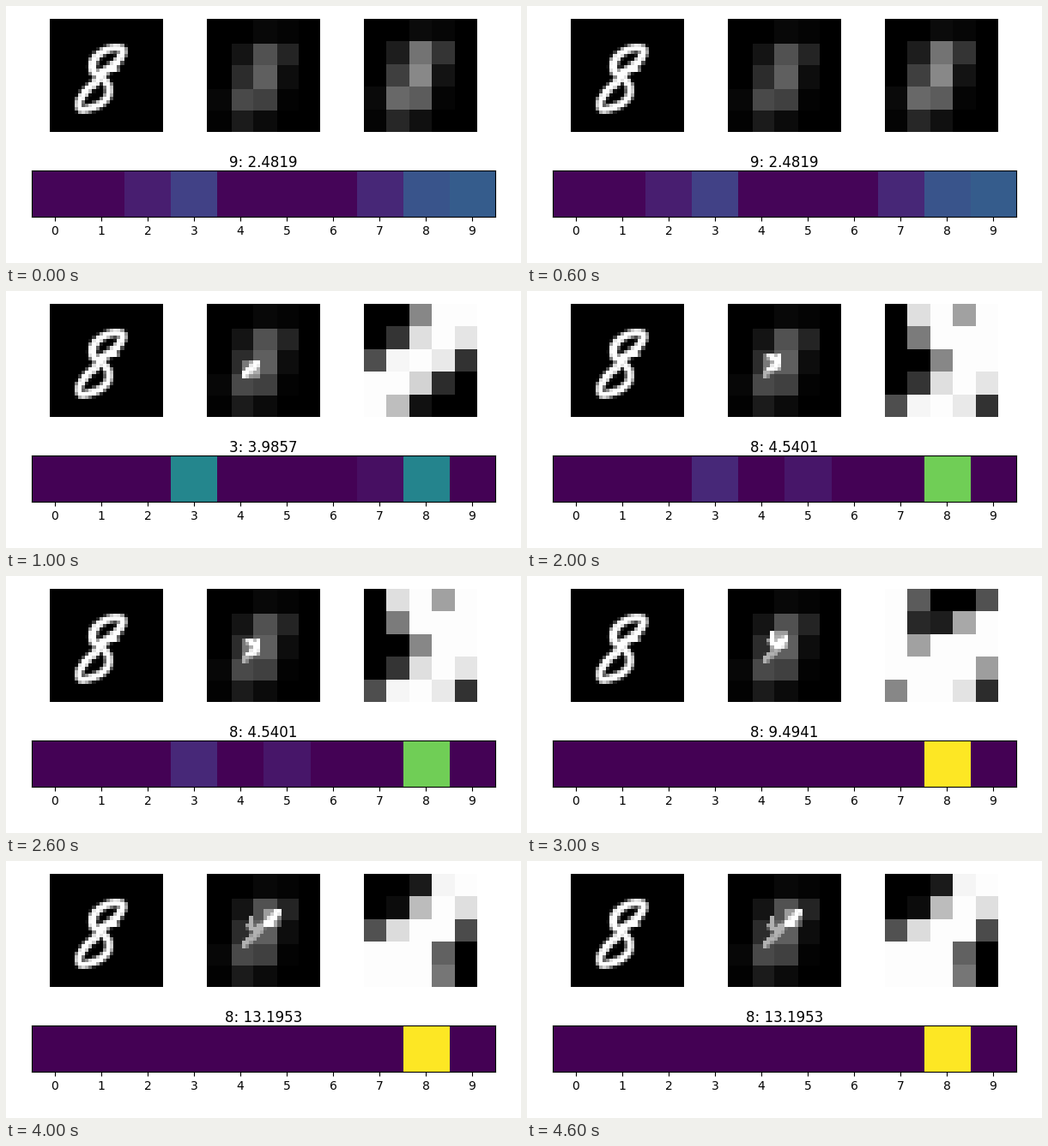
Animation, 600 px wide and 300 px high, one loop 5000 ms. Source, as a matplotlib script:

```python
import numpy as np
import matplotlib.pyplot as plt
from matplotlib.animation import FuncAnimation

W, H, DPI = 600, 300, 100
N, G = 32, 5  # image side, glimpse side

# Key points of the closed pen path, in image cells
EIGHT = [
    (14.6, 15.3), (18.6, 12.6), (20.3, 10.3), (20.3, 8.5),
    (17.6, 8.3), (14.2, 9.8), (12.2, 12.4), (12.5, 15),
    (14.8, 16.8), (16.6, 19.2), (16.2, 22.2), (13.2, 24.6),
    (9, 25.7), (8.4, 23.2), (10.5, 20.3), (13.5, 17.5),
]

# Title, glimpse corner (column, row) and main class probabilities
STEPS = [
    ("9: 2.4819", None, {2: .083, 3: .195, 7: .11, 8: .26, 9: .29}),
    ("3: 3.9857", (10, 16), {3: .46, 7: .04, 8: .45}),
    ("8: 4.5401", (10, 14), {3: .115, 5: .06, 8: .785}),
    ("8: 9.4941", (12, 12), {8: 1}),
    ("8: 13.1953", (16, 10), {8: 1}),
]


def smooth_loop(points, steps=40):
    """Closed Catmull-Rom curve through the points."""
    b = np.array(points)
    a, c, d = (np.roll(b, k, axis=0) for k in (1, -1, -2))
    t = np.linspace(0, 1, steps, endpoint=False)[:, None, None]
    curve = (2 * b + (c - a) * t + (2 * a - 5 * b + 4 * c - d) * t**2
             + (3 * b - a - 3 * c + d) * t**3) / 2
    return curve.reshape(-1, 2)


def ink(path, half):
    """Soft coverage of a pen stroke with the given half width."""
    y, x = np.mgrid[:N, :N] + 0.5
    dist = np.hypot(x[..., None] - path[:, 0], y[..., None] - path[:, 1])
    return np.clip(0.5 + half - dist.min(axis=-1), 0, 1)


def shrink(img):
    """Resample to the glimpse size with a triangle filter."""
    scale = N / G
    centres = (np.arange(G) + 0.5) * scale
    w = np.maximum(0, 1 - abs(np.arange(N) + 0.5 - centres[:, None]) / scale)
    w /= w.sum(axis=1, keepdims=True)
    return w @ img @ w.T


def window(spot):
    col, row = spot
    return slice(row, row + G), slice(col, col + G)


arm = np.linspace((13.4, 15.4), (19, 14.3), 40)
digit = np.minimum(ink(smooth_loop(EIGHT), 1.1) + ink(arm, 0.5), 0.99)
coarse = shrink(digit)
cell = np.arange(N) * G // N


def memory(i):
    """Everything seen up to step i, with the current glimpse highlighted."""
    seen = coarse[np.ix_(cell, cell)]
    for _, spot, _ in STEPS[1:i + 1]:
        win = window(spot)
        seen[win] = np.maximum(seen[win], digit[win])
    seen *= 0.7
    if i:
        seen[win] += 0.3
    return seen


def glimpse(i):
    return digit[window(STEPS[i][1])] if i else coarse


def classes(i):
    """Main probabilities, with the remainder shared by the other classes."""
    main = STEPS[i][2]
    rest = (1 - sum(main.values())) / (10 - len(main))
    return [[main.get(k, rest) for k in range(10)]]


fig = plt.figure(figsize=(W / DPI, H / DPI), dpi=DPI, facecolor="white")


def panel(x, y, w, h, data, cmap="gray"):
    ax = fig.add_axes([x / W, 1 - (y + h) / H, w / W, h / H])
    img = ax.imshow(data, cmap=cmap, vmin=0, vmax=1,
                    interpolation="nearest", aspect="auto")
    return ax, img


digit_ax, _ = panel(51, 15, 132, 132, digit)
memory_ax, memory_img = panel(234, 15, 132, 132, memory(0))
glimpse_ax, glimpse_img = panel(416.6, 15, 132, 132, glimpse(0))
for ax in (digit_ax, memory_ax, glimpse_ax):
    ax.axis("off")

bar_ax, bar_img = panel(29.9, 192.4, 540.1, 54, classes(0), "viridis")
bar_ax.set_xticks(range(10))
bar_ax.set_yticks([])
title = bar_ax.set_title(STEPS[0][0], pad=1.8)


def update(i):
    memory_img.set_data(memory(i))
    glimpse_img.set_data(glimpse(i))
    bar_img.set_data(classes(i))
    title.set_text(STEPS[i][0])
    return memory_img, glimpse_img, bar_img, title


anim = FuncAnimation(fig, update, frames=len(STEPS), interval=1000, repeat=True)
plt.show()
```
